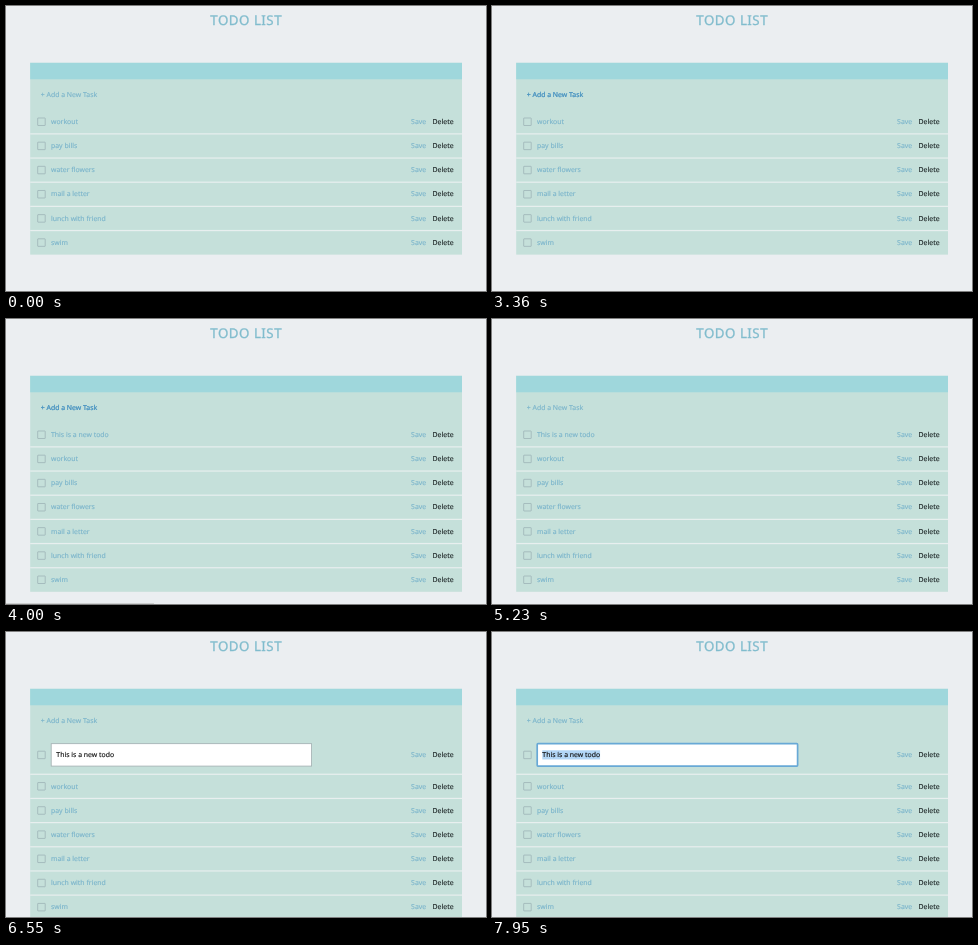
These frames come from a looping animation (480 px wide and 285 px high, 8 s). An HTML page:

```html
<!DOCTYPE html>
<html lang="en">
<head>
<meta charset="utf-8">
<title>Todo list</title>
<style>
  html, body { margin: 0; width: 100%; height: 100%; overflow: hidden; background: #ebeef1; }
  svg { display: block; width: 100%; height: 100%; }
  text { font: 6.9px "Noto Sans", sans-serif; text-rendering: geometricPrecision; white-space: pre; stroke-width: .14px; }
  .title { font-size: 13.3px; letter-spacing: .5px; stroke-width: .3px; }
</style>
</head>
<body>
<svg id="stage" viewBox="0 0 480 285"></svg>
<script>
const LOOP = 8000;
const HOVER = 3360, STATUS_ON = 3460, ADDED = 3910, LEAVE = 4180, STATUS_OFF = 5090;
const EDIT = 5820, FOCUS = 7140, SELECT = 7410, SELECTED = 7950;
const ROW = 24.17, FIRST_ROW = 103.6, EDIT_EXTRA = 14.4;
const LINK = "#7ab4cb", LINK_HOVER = "#4a93c1", INK = "#1c2425";
const NEW_TASK = "This is a new todo";
const TASKS = ["workout", "pay bills", "water flowers", "mail a letter", "lunch with friend", "swim"];

const stage = document.getElementById("stage");
const progress = (t, from, to) => Math.min(1, Math.max(0, (t - from) / (to - from)));
const rect = (x, y, w, h, fill, extra = "") =>
  `<rect x="${x}" y="${y}" width="${w}" height="${h}" fill="${fill}" ${extra}/>`;
const label = (x, y, text, color, extra = "") =>
  `<text x="${x}" y="${y}" fill="${color}" stroke="${color}" ${extra}>${text}</text>`;

// Advance width of the edited text, used for the caret and the selection
stage.innerHTML = label(0, 0, NEW_TASK, INK);
const textWidth = stage.firstChild.getComputedTextLength();

function input(t, middle) {
  const left = 50.3, right = left + textWidth;
  const focused = t >= FOCUS, selecting = t >= SELECT;
  const border = focused
    ? 'stroke="#68a9d6" stroke-width="1.7" rx=".8"'
    : 'stroke="#a0adb0" stroke-width=".8"';
  let out = rect(45.2, middle - 11.2, 260.4, 22.4, "#fff", border);
  if (selecting) {
    const steps = 13;
    const done = Math.floor(progress(t, SELECT, SELECTED) * (steps - 1) + 1) / steps;
    const width = textWidth * done;
    out += rect(right - width, middle - 4.6, width, 9.2, "#b2d6f6");
  } else if (focused) {
    out += rect(right + .2, middle - 4, .6, 8, "#222");
  }
  return out + label(left, middle + 2.3, NEW_TASK, "#111");
}

function taskRow(t, text, top, height, editing) {
  const middle = top + height / 2;
  const base = middle + 2.3;
  return rect(31.7, middle - 3.7, 7.5, 7.5, "none", 'rx=".3" stroke="#9bb0b4" stroke-width=".75"')
    + (editing ? input(t, middle) : label(45, base, text, LINK))
    + label(405.1, base, "Save", LINK)
    + label(426.6, base, "Delete", INK);
}

function addLink(t) {
  const hover = t < HOVER ? 0 : 1 - progress(t, LEAVE, LEAVE + 550);
  return label(34.8, 90.8, "+ Add a New Task", LINK)
    + label(34.8, 90.8, "+ Add a New Task", LINK_HOVER, `opacity="${hover}"`);
}

function render(t) {
  const tasks = t >= ADDED ? [NEW_TASK, ...TASKS] : TASKS;
  const editing = t >= EDIT;
  const panelEnd = FIRST_ROW + tasks.length * ROW + (editing ? EDIT_EXTRA : 0);

  let out = rect(0, 0, 480, 285, "#ebeef1")
    + label(240.2, 19.1, "TODO LIST", "#80bccd", 'class="title" text-anchor="middle"')
    + rect(24.2, 56.8, 431.8, panelEnd - 56.8, "#c5e0da")
    + rect(24.2, 56.8, 431.8, 16.5, "#9fd7dc")
    + addLink(t);

  let top = FIRST_ROW;
  tasks.forEach((text, i) => {
    const open = editing && i === 0;
    const height = ROW + (open ? EDIT_EXTRA : 0);
    out += taskRow(t, text, top, height, open);
    top += height;
    if (i < tasks.length - 1) out += rect(24.2, top - .5, 431.8, 1.2, "#e8efef");
  });

  if (t >= HOVER && t < STATUS_OFF) {
    const shown = progress(t, STATUS_ON, STATUS_ON + 90);
    out += rect(0, 284, 148, 1, "#cccecf", `opacity="${shown}"`);
  }
  stage.innerHTML = out;
}

const start = performance.now();
function frame() {
  render((performance.now() - start) % LOOP);
  requestAnimationFrame(frame);
}
frame();
</script>
</body>
</html>
```
